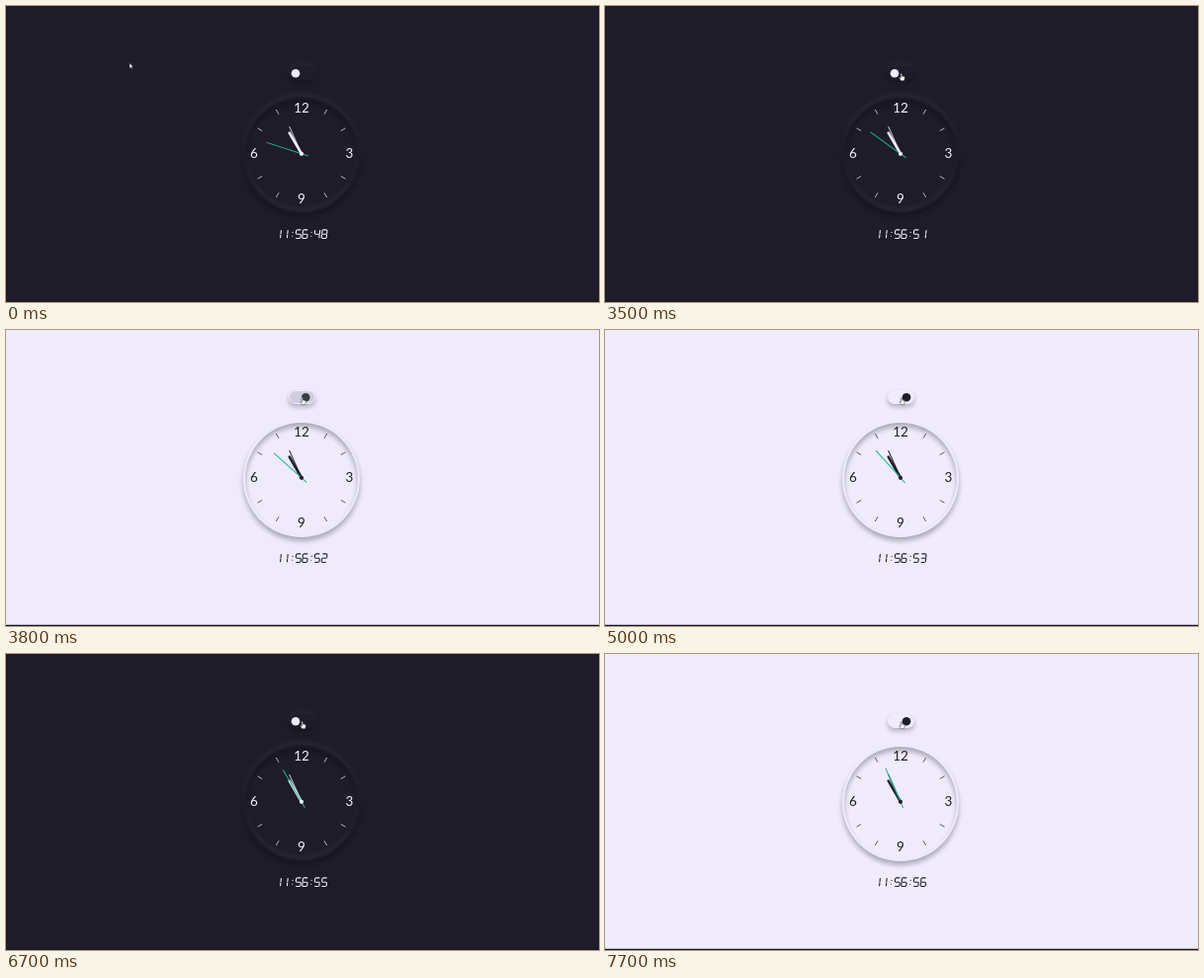
Recreate the animation shown at these times as an HTML page. Size 600x300 px, loop 8000 ms.

```html
<!DOCTYPE html>
<html lang="en">
<head>
<meta charset="utf-8">
<title>Clock</title>
<style>
  html, body { margin: 0; width: 100%; height: 100%; overflow: hidden; }
  #stage { position: relative; width: 600px; height: 300px; overflow: hidden; }
  #stage > * { position: absolute; box-sizing: border-box; }
  #face {
    left: 240px; top: 91.5px; width: 118px; height: 118px;
    border: 2.5px solid transparent; border-radius: 50%;
    box-shadow: 0 -4px 5px rgba(255,255,255,.045), inset 0 -4px 5px rgba(255,255,255,.045),
                0 4px 5px rgba(0,0,0,.28), inset 0 4px 5px rgba(0,0,0,.28);
  }
  #track {
    left: 286px; top: 61px; width: 26.5px; height: 14px;
    border: 1.5px solid; border-radius: 7px;
    box-shadow: 0 -4px 5px rgba(255,255,255,.035), 0 3px 5px rgba(0,0,0,.25);
  }
  svg { left: 0; top: 0; }
  text { font: 13.5px Lato, sans-serif; text-anchor: middle; }
  line, path { stroke-linecap: round; }
</style>
</head>
<body>
<div id="stage">
  <div id="face"></div>
  <div id="track"></div>
  <svg width="600" height="300" viewBox="0 0 600 300">
    <circle id="knob" cy="68.2" r="4.3"/>
    <g id="ink">
      <g id="dial"></g>
      <path id="digits" fill="none" stroke="currentColor" stroke-width="1.1"
            transform="translate(0 231.2) skewX(-6)"/>
    </g>
    <g transform="translate(299 149.8)">
      <line id="minute" y2="-30" stroke-width="1.1" transform="rotate(336)"/>
      <line id="hour" y1="-1" y2="-24.5" stroke-width="2.6" transform="rotate(330)"/>
      <line id="second" y1="6.5" y2="-37" stroke="#1fb49a" stroke-width="1"/>
      <circle id="pin" r="2.1"/>
    </g>
    <rect y="298.8" width="600" height="1.2" fill="#18161e"/>
    <g id="cursor" fill="#fff" stroke="#36323f" stroke-width=".5" stroke-linejoin="round">
      <path id="arrow" d="M0 0V5L1.2 4L2 5.8L2.9 5.4L2.1 3.7H3.7Z"/>
      <path id="hand" d="M-.6 .6Q0-.5 .6 .6V2.8L3 3.3Q3.7 3.6 3.5 4.6L2.9 7.4H-.4L-2 4.6Q-1.8 3.5-.6 4.5Z"/>
    </g>
  </svg>
</div>
<script>
const $ = id => document.getElementById(id);
const LOOP = 8000, FRAME = 100;
const DARK = [31, 28, 41], LIGHT = [240, 235, 253];
const TICKS = [600, 1600, 2600, 3700, 4700, 5700, 6600, 7600];
const CLICKS = [3520, 5420, 6750];

// time, x, y of the pointer tip
const PATH = [
  [0, 125, 58], [400, 139, 72], [1200, 139, 72], [1300, 200, 112], [1400, 200, 112],
  [1500, 262, 121], [1600, 322, 121], [1700, 351, 114], [1800, 358, 106],
  [2300, 317, 74], [2700, 301, 68.3], [2800, 299.8, 68.3]
];

const SEGMENTS = {
  a: [.8, -4.3, 4.2, -4.3], b: [5, -3.6, 5, -.7], c: [5, .7, 5, 3.6], d: [.8, 4.3, 4.2, 4.3],
  e: [0, .7, 0, 3.6], f: [0, -3.6, 0, -.7], g: [.8, 0, 4.2, 0]
};
const GLYPHS = 'abcdef bc abged abgcd fgbc afgcd afgedc abc abcdefg abcdfg'.split(' ');
const CELLS = [273, 279.8, 293.3, 300.1, 312.3, 319.6];

const mix = (a, b, p) => a + (b - a) * p;
const rgb = p => `rgb(${DARK.map((v, i) => Math.round(mix(v, LIGHT[i], p)))})`;

// CSS "ease": cubic-bezier(.25, .1, .25, 1)
function ease(x) {
  if (x <= 0 || x >= 1) return x <= 0 ? 0 : 1;
  const curve = (u, p, q) => 3 * u * (1 - u) * ((1 - u) * p + u * q) + u ** 3;
  let lo = 0, hi = 1;
  for (let i = 0; i < 20; i++) {
    const u = (lo + hi) / 2;
    if (curve(u, .25, .25) < x) lo = u; else hi = u;
  }
  return curve(lo, .1, 1);
}

// 0 is dark, 1 is light
function theme(t, duration) {
  const n = CLICKS.filter(c => t >= c).length;
  if (!n) return 0;
  const p = duration ? ease((t - CLICKS[n - 1]) / duration) : 1;
  return n % 2 ? p : 1 - p;
}

function pointer(t) {
  const i = PATH.findIndex(k => k[0] > t);
  if (i < 0) return PATH[PATH.length - 1].slice(1);
  const [a, b] = [PATH[i - 1], PATH[i]], p = (t - a[0]) / (b[0] - a[0]);
  return [mix(a[1], b[1], p), mix(a[2], b[2], p)];
}

function digitPath(text) {
  let d = '';
  [...text].forEach((ch, i) => {
    for (const s of GLYPHS[ch]) {
      const [x1, y1, x2, y2] = SEGMENTS[s];
      d += `M${CELLS[i] + x1} ${y1}L${CELLS[i] + x2} ${y2}`;
    }
  });
  for (const x of [289.9, 309]) d += `M${x} -1.8h.01M${x} 2h.01`;
  return d;
}

function buildDial() {
  let html = '';
  for (let i = 0; i < 12; i++) {
    if (i % 3) html += `<line y1="-46.3" y2="-51" stroke="currentColor" stroke-width=".8"
      opacity=".8" transform="translate(299 149.5) rotate(${i * 30})"/>`;
  }
  [['12', 299, 108.2], ['3', 347.5, 154.2], ['9', 299, 200], ['6', 250.8, 154.2]]
    .forEach(([s, x, y]) => html += `<text x="${x}" y="${y}" fill="currentColor">${s}</text>`);
  $('dial').innerHTML = html;
}

function draw(t) {
  const now = theme(t, 0), page = theme(t, 300), slow = theme(t, 500);
  const ink = now ? '#211e2b' : '#f3effa';
  const sec = 48 + TICKS.filter(k => t >= k).length;

  $('stage').style.background = rgb(page);
  $('track').style.background = rgb(slow);
  $('track').style.borderColor = rgb(now);
  $('knob').setAttribute('cx', mix(293, 305, slow));
  $('knob').setAttribute('fill', rgb(1 - slow));

  $('ink').style.color = ink;
  $('digits').setAttribute('d', digitPath('1156' + sec));
  $('hour').setAttribute('stroke', ink);
  $('pin').setAttribute('fill', ink);
  $('minute').setAttribute('stroke', rgb(mix(.75, 0, slow)));
  $('second').setAttribute('transform', `rotate(${sec * 6})`);

  const over = t >= 2700;
  $('cursor').setAttribute('transform', `translate(${pointer(t)})`);
  $('arrow').style.display = over ? 'none' : '';
  $('hand').style.display = over ? '' : 'none';
}

buildDial();
const start = performance.now();
function loop() {
  const t = (performance.now() - start) % LOOP;
  draw(Math.floor(t / FRAME) * FRAME);
  requestAnimationFrame(loop);
}
loop();
</script>
</body>
</html>
```
